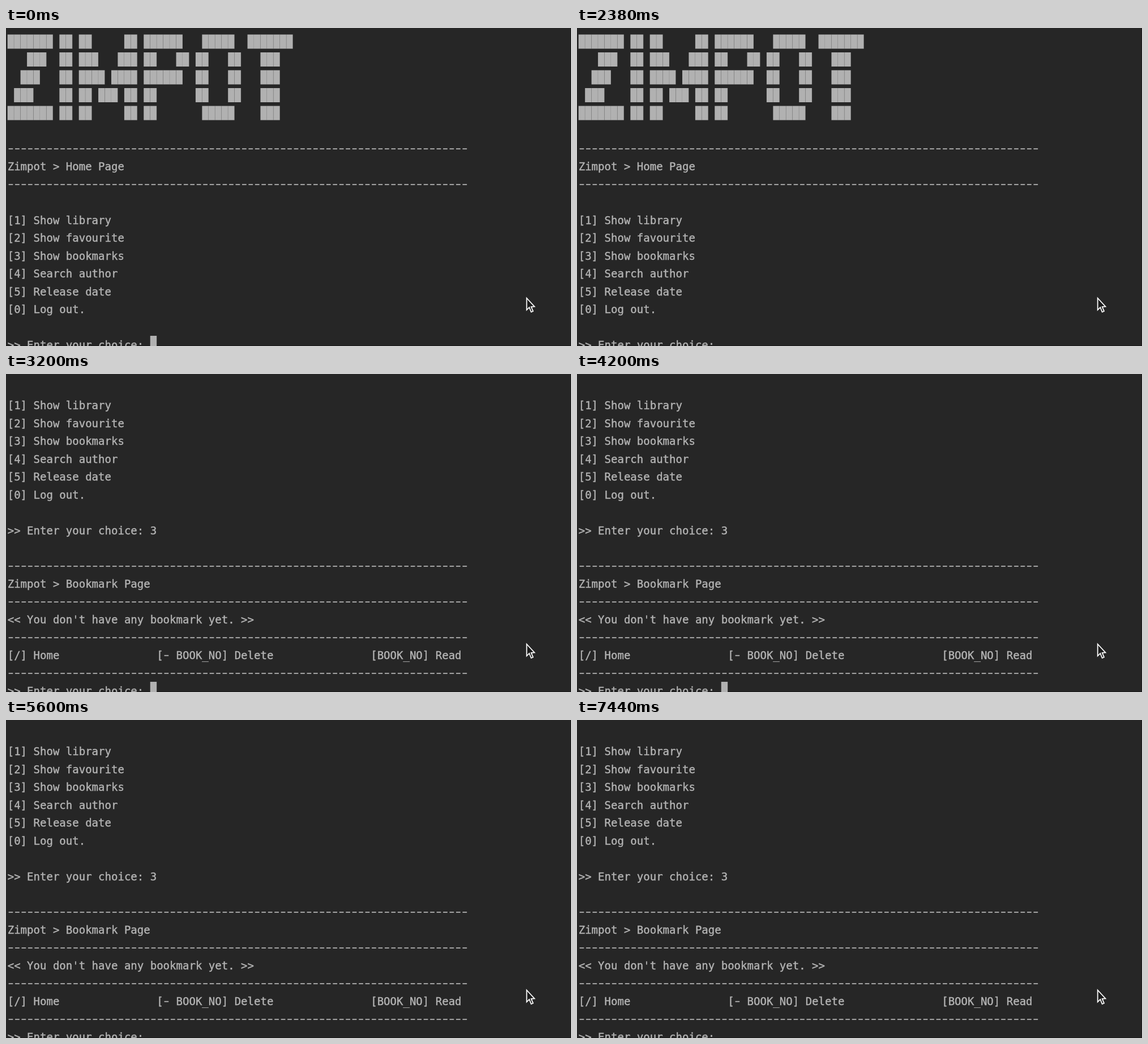
These frames come from a looping animation (998 px wide and 561 px high, 8 s). An HTML page with a canvas:

```html
<!DOCTYPE html>
<html lang="en">
<head>
<meta charset="utf-8">
<title>Terminal session</title>
<style>
  html, body { margin: 0; width: 100%; height: 100%; overflow: hidden; background: #262626; }
  canvas { display: block; }
</style>
</head>
<body>
<canvas id="stage" width="998" height="561"></canvas>
<script>
const ctx = document.getElementById('stage').getContext('2d');
const LOOP = 8000, LEFT = 2.7, CELL = 11.455, ROW = 31.5;
const BACK = '#262626', INK = '#b4b4b4', BLOCK = '#b1b1b1';

const rule = '-'.repeat(71);
const prompt = '>> Enter your choice: ';
const menu = [
  '[1] Show library',
  '[2] Show favourite',
  '[3] Show bookmarks',
  '[4] Search author',
  '[5] Release date',
  '[0] Log out.',
  ''
];
const banner = [
  '####### ## ##     ## ######   #####  #######',
  '   ###  ## ###   ### ##   ## ##   ##   ###',
  '  ###   ## #### #### ######  ##   ##   ###',
  ' ###    ## ## ### ## ##      ##   ##   ###',
  '####### ## ##     ## ##       #####    ###'
];
const homePage = [...banner, '', rule, 'Zimpot > Home Page', rule, '', ...menu];
const bookmarkPage = [
  '', ...menu, prompt + '3', '',
  rule, 'Zimpot > Bookmark Page', rule,
  "<< You don't have any bookmark yet. >>", rule,
  '[/] Home'.padEnd(23) + '[- BOOK_NO] Delete'.padEnd(33) + '[BOOK_NO] Read', rule
];

const cellX = col => LEFT + col * CELL;

function drawBlock(col, row) {
  const x = cellX(col), y = row * ROW + 11.5;
  ctx.fillStyle = BLOCK;
  ctx.fillRect(x, y, CELL, 25);
  ctx.fillStyle = 'rgba(38,38,38,.2)';
  ctx.fillRect(x + CELL - 0.5, y, 1, 25);
}

function drawLine(line, row) {
  const baseline = (row + 1) * ROW - 0.8;
  [...line].forEach((char, col) => {
    if (char === '#') return drawBlock(col, row);
    ctx.fillStyle = INK;
    if (char === '-') ctx.fillRect(cellX(col) + 1.9, baseline - 7.4, 7.7, 1.8);
    else if (char !== ' ') {
      ctx.fillText(char, cellX(col), baseline);
      ctx.strokeText(char, cellX(col), baseline);
    }
  });
}

function drawPointer() {
  ctx.beginPath();
  [[919.7, 476.5], [919.7, 497.3], [924.3, 492.9], [927.7, 501],
   [931, 499.6], [927.7, 491.8], [933.5, 491.4]].forEach(p => ctx.lineTo(...p));
  ctx.closePath();
  ctx.fillStyle = '#1c1c1c';
  ctx.fill();
  ctx.strokeStyle = '#f8f8f8';
  ctx.lineWidth = 1.8;
  ctx.stroke();
}

function render(t) {
  const typed = t >= 2640 && t < 3200 ? '3' : '';
  const caretOn = t < 1100 || (t >= 2500 && t < 4600) || (t >= 6020 && t < 7440);
  const page = t < 3200 ? homePage : bookmarkPage;

  ctx.fillStyle = BACK;
  ctx.fillRect(0, 0, 998, 561);
  ctx.fillStyle = '#1b1b1b';
  ctx.fillRect(0, 560, 998, 1);
  ctx.fillRect(997, 0, 1, 561);

  ctx.font = '19.03px "DejaVu Sans Mono", monospace';
  ctx.strokeStyle = INK;
  ctx.lineWidth = 0.4;
  [...page, prompt + typed].forEach(drawLine);
  if (caretOn) {
    ctx.fillStyle = BLOCK;
    ctx.fillRect(cellX(prompt.length + typed.length), 543, CELL, 18);
  }
  drawPointer();
}

function tick() {
  render(performance.now() % LOOP);
  requestAnimationFrame(tick);
}
tick();
</script>
</body>
</html>
```
